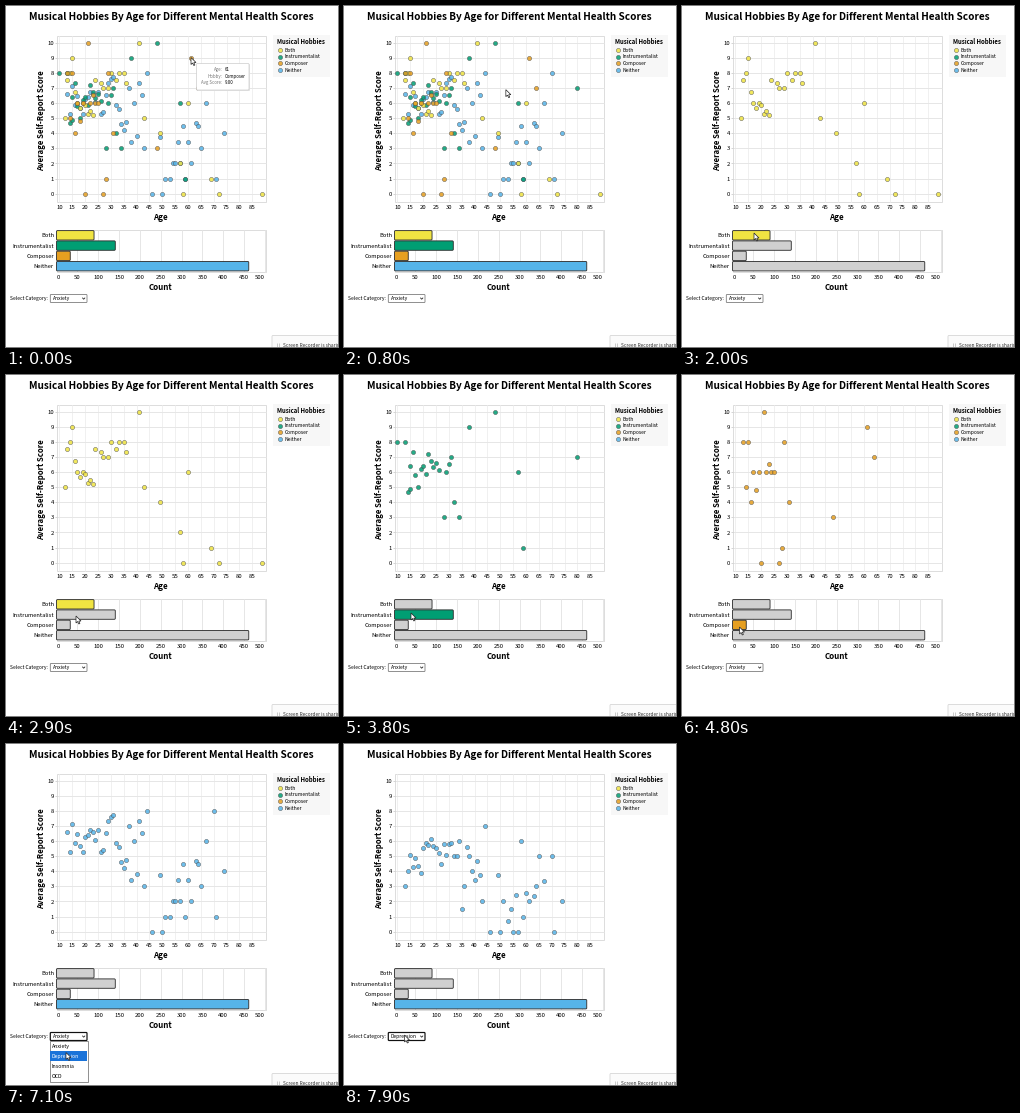
Recreate the animation shown at these times as a matplotlib script. Size 332 by 341 pixels, loop 8000 ms.

```python
import numpy as np
import matplotlib.pyplot as plt
from matplotlib.animation import FuncAnimation
from matplotlib.patches import FancyBboxPatch, Polygon, Rectangle

W, H, DPI = 332, 341, 64
STEP, FRAMES = 100, 80
PT = 72 / DPI  # points per pixel

plt.rcParams["font.family"] = ["Noto Sans CJK JP", "Liberation Sans"]

COLORS = {"Both": "#f0e442", "Instrumentalist": "#009e73",
          "Composer": "#e69f20", "Neither": "#56b4e9"}
COUNTS = {"Both": 90, "Instrumentalist": 141, "Composer": 33, "Neither": 461}
OPTIONS = ["Anxiety", "Depression", "Insomnia", "OCD"]

# (age, mean score) for each hobby
BOTH = [(12, 5), (13, 7.5), (14, 8), (15, 9), (16, 6.7), (17, 6), (18, 5.67),
        (19, 6), (20, 5.9), (21, 5.25), (22, 5.45), (23, 5.2), (24, 7.5),
        (26, 7.35), (27, 7), (29, 7), (30, 8), (32, 7.5), (33, 8), (35, 8),
        (36, 7.33), (41, 10), (43, 5), (49, 4), (57, 2), (58, 0), (60, 6),
        (69, 1), (72, 0), (89, 0)]
INSTRUMENTALIST = [(10, 8), (13, 8), (14, 4.7), (15, 4.9), (15, 6.4),
                   (16, 7.3), (17, 5.8), (18, 5), (19, 6.2), (20, 6.4),
                   (21, 5.9), (22, 7.2), (23, 6.7), (24, 6.3), (25, 6.6),
                   (26, 6.1), (28, 3), (29, 6), (30, 6.5), (31, 7), (32, 4),
                   (34, 3), (38, 9), (48, 10), (57, 6), (59, 1), (80, 7)]
COMPOSER = [(13, 8), (14, 5), (15, 8), (16, 4), (17, 6), (18, 4.8), (19, 6),
            (20, 0), (21, 10), (22, 6), (23, 6.5), (24, 6), (25, 6), (27, 0),
            (28, 1), (29, 8), (31, 4), (48, 3), (61, 9), (64, 7)]
AGES = [*range(13, 45), 46, 49, 50, 51, *range(53, 62), 63, 64, 65, 67, 70,
        71, 74]
ANXIETY = [6.6, 5.25, 7.1, 5.9, 6.45, 5.7, 5.3, 6.25, 6.4, 6.7, 6.6, 6.05,
           6.75, 5.3, 5.4, 6.5, 7.35, 7.6, 7.75, 5.9, 5.6, 4.6, 4.2, 4.75, 7,
           3.4, 6, 3.8, 7.35, 6.5, 3, 8, 0, 3.75, 0, 1, 1, 2, 2, 3.4, 2, 4.5,
           1, 3.4, 2, 4.67, 4.5, 3, 6, 8, 1, 4]
DEPRESSION = [3, 4, 5.1, 4.25, 4.85, 4.35, 3.9, 5.55, 5.9, 5.75, 6.1, 5.7,
              5.55, 5.2, 4.45, 5.8, 5.1, 5.8, 5.85, 5, 5, 6, 1.5, 3, 5.6, 5,
              4, 3.4, 4.65, 3.75, 2, 7, 0, 3.75, 0, 2, .67, 1.5, 0, 2.4, 0, 6,
              1, 2.55, 2, 2.35, 3, 5, 3.33, 5, 0, 2]

# Time in ms of each event, and the cursor path as (ms, x, y)
PICKS = [(2000, "Both"), (3500, "Instrumentalist"), (4500, "Composer"),
         (5400, "Neither")]
TOOLTIP_OFF, MENU_OPEN, MENU_CLOSE = 100, 6500, 7500
PATH = [(0, 185, 51.5), (200, 178, 66), (600, 178, 66), (1300, 96.5, 155),
        (2000, 72, 227), (2500, 72, 229), (2900, 70, 241), (3500, 67, 238),
        (3800, 67, 238), (4400, 59, 248), (4800, 57.5, 252), (5400, 58, 259),
        (5800, 58, 263), (6400, 60, 291), (6600, 60, 291), (7100, 60, 308.5),
        (7500, 60, 309), (7800, 60.5, 291), (8000, 60.5, 291)]


def px(age):
    return 50 + 2.57 * (np.asarray(age) - 8.65)


def py(score):
    return 187.6 - 15.1 * np.asarray(score)


def bx(count):
    return 50.5 + 0.417 * count


fig = plt.figure(figsize=(W / DPI, H / DPI), dpi=DPI, facecolor="white")
ax = fig.add_axes([0, 0, 1, 1])
ax.set(xlim=(0, W), ylim=(H, 0))
ax.axis("off")


def label(x, y, s, size, ha="left", bold=False, color="black", z=5, rot=0):
    """Text whose capitals are centred on y."""
    shift = 0.36 * size
    dx, dy = (shift, 0) if rot else (0, shift)
    return ax.text(x + dx, y + dy, s, fontsize=size * PT, ha=ha, color=color,
                   va="center" if False else "baseline", zorder=z,
                   weight="bold" if bold else "normal", rotation=rot)


def line(xs, ys, color, lw=1, z=1):
    return ax.plot(xs, ys, color=color, lw=lw * PT, zorder=z,
                   solid_capstyle="butt")[0]


def box(x0, y0, x1, y1, fc="white", ec="none", lw=1, z=3):
    return ax.add_patch(Rectangle((x0, y0), x1 - x0, y1 - y0, fc=fc, ec=ec,
                                  lw=lw * PT, zorder=z))


def rounded(x0, y0, x1, y1, fc="white", ec="black", lw=1, r=1, z=3):
    style = f"round,pad=0,rounding_size={r}"
    return ax.add_patch(FancyBboxPatch((x0, y0), x1 - x0, y1 - y0, fc=fc,
                                       ec=ec, lw=lw * PT, boxstyle=style,
                                       zorder=z))


def dots(x, y, color, r, z):
    return ax.scatter(x, y, s=(2 * r * PT) ** 2, c=color, alpha=0.85,
                      edgecolors="#4a4a4a", linewidths=0.5 * PT, zorder=z)


def draw_scatter():
    box(50.5, 29.5, 259.5, 195.5, ec="#dddddd", z=0)
    for age in range(10, 90, 5):
        line([px(age)] * 2, [29.5, 195.5], "#f0f0f0")
        label(px(age), 201, str(age), 6, "center")
    for score in range(11):
        line([50.5, 259.5], [py(score)] * 2, "#e6e6e6")
        line([48.5, 50.5], [py(score)] * 2, "#bbbbbb", 0.6)
        label(48, py(score), str(score), 6, "right")
    label(154.5, 211, "Age", 8, "center", True)
    ax.text(38, 115, "Average Self-Report Score", fontsize=7.8 * PT,
            weight="bold", rotation=90, rotation_mode="anchor", ha="center",
            va="baseline")
    points = {"Neither": (AGES, ANXIETY)}
    for name, data in (("Instrumentalist", INSTRUMENTALIST), ("Both", BOTH),
                       ("Composer", COMPOSER)):
        points[name] = tuple(zip(*data))
    return {name: dots(px(a), py(s), COLORS[name], 2.1, 4)
            for name, (a, s) in points.items()}


def draw_bars():
    box(50.5, 224, 259.5, 266, ec="#dddddd", z=0)
    for count in range(0, 501, 50):
        line([bx(count)] * 2, [224, 266], "#e6e6e6")
        ha = {0: "left", 500: "right"}.get(count, "center")
        label(bx(count) + (count == 0) * 0.5, 271.3, str(count), 6, ha)
    label(154.5, 281, "Count", 8, "center", True)
    bars = {}
    for i, (name, count) in enumerate(COUNTS.items()):
        y = 224.6 + 10.3 * i
        label(48, y + 4.7, name, 5.8, "right")
        bars[name] = rounded(50.5, y, bx(count), y + 9.4, COLORS[name],
                             "#333333", 0.9)
    return bars


def draw_legend():
    box(267, 29, 324, 71, "#f7f7f7", z=0)
    label(271, 35.7, "Musical Hobbies", 6, bold=True)
    for i, (name, color) in enumerate(COLORS.items()):
        y = 44 + 6.7 * i
        dots([274], [y], color, 2.1, 4)
        label(278.5, y, name, 5)


def draw_tooltip():
    parts = [rounded(191, 58, 244, 85, "#e4e4e4", "none", z=6),
             rounded(190.5, 57.5, 243, 84, "white", "#cccccc", 0.7, z=7)]
    rows = [("Age:", "61"), ("Hobby:", "Composer"), ("Avg Score:", "9.00")]
    for i, (key, value) in enumerate(rows):
        y = 63.5 + 6.7 * i
        parts.append(label(216.5, y, key, 4.4, "right", color="#777777", z=8))
        parts.append(label(219, y, value, 4.4, z=8))
    return parts


def draw_menu():
    parts = [box(43.5, 296.5, 81.5, 337.5, "white", "#777777", 0.8, 6)]
    stripe = box(44, 297, 81, 307, "#1a73d9", z=7)
    names = [label(46, 302 + 10 * i, s, 5.2, z=8)
             for i, s in enumerate(OPTIONS)]
    return parts + [stripe] + names, stripe, names


def draw_popup():
    line([0, 266], [340.5, 340.5], "#a8a8a8")
    rounded(266, 329.5, 340, 350, "#fbfbfb", "#d4d4d4", 0.8, z=3)
    for x in (271, 272.6):
        line([x, x], [337, 341], "#aaaaaa", 0.6, 4)
    label(277, 339, "Screen Recorder is sharing", 4.8, color="#333333")


label(165, 10.3, "Musical Hobbies By Age for Different Mental Health Scores",
      10, "center", True)
points = draw_scatter()
bars = draw_bars()
draw_legend()
draw_popup()
tooltip = draw_tooltip()

label(4, 292.3, "Select Category:", 5)
field = rounded(44.3, 288.5, 81, 296.5, "white", "#767676", 0.8, 0.8)
chosen = label(46.5, 292.4, OPTIONS[0], 5)
line([76.3, 77.7, 79.1], [291.7, 293.2, 291.7], "#222222", 0.8, 5)
menu, stripe, names = draw_menu()

ARROW = np.array([(0, 0), (0, 7), (1.6, 5.5), (2.8, 8), (3.9, 7.5),
                  (2.8, 5.1), (5, 5)])
cursor = ax.add_patch(Polygon(ARROW, fc="white", ec="#222222", lw=0.7 * PT,
                              zorder=10))


def cursor_at(t):
    for (t0, x0, y0), (t1, x1, y1) in zip(PATH, PATH[1:]):
        if t <= t1:
            u = (t - t0) / (t1 - t0)
            u = u * u * (3 - 2 * u)
            return x0 + (x1 - x0) * u, y0 + (y1 - y0) * u


def update(i):
    t = i * STEP
    x, y = cursor_at(t)
    cursor.set_xy(ARROW + (x, y))

    picked = None
    for start, name in PICKS:
        if t >= start:
            picked = name
    for name in COLORS:
        active = picked in (None, name)
        points[name].set_visible(active)
        bars[name].set_facecolor(COLORS[name] if active else "#d0d0d0")

    changed = t >= MENU_CLOSE
    scores = DEPRESSION if changed else ANXIETY
    points["Neither"].set_offsets(np.column_stack([px(AGES), py(scores)]))
    chosen.set_text(OPTIONS[int(changed)])
    focused = t >= MENU_OPEN
    field.set_edgecolor("#111111" if focused else "#767676")
    field.set_linewidth((1.2 if focused else 0.8) * PT)

    for part in tooltip:
        part.set_visible(t < TOOLTIP_OFF)
    for part in menu:
        part.set_visible(MENU_OPEN <= t < MENU_CLOSE)
    row = int(np.clip((y - 297) // 10, 0, 3))
    stripe.set_y(297 + 10 * row)
    for k, name in enumerate(names):
        name.set_color("white" if k == row else "black")
    return []


anim = FuncAnimation(fig, update, frames=FRAMES, interval=STEP, repeat=True,
                     repeat_delay=0, blit=False)
plt.show()
```
